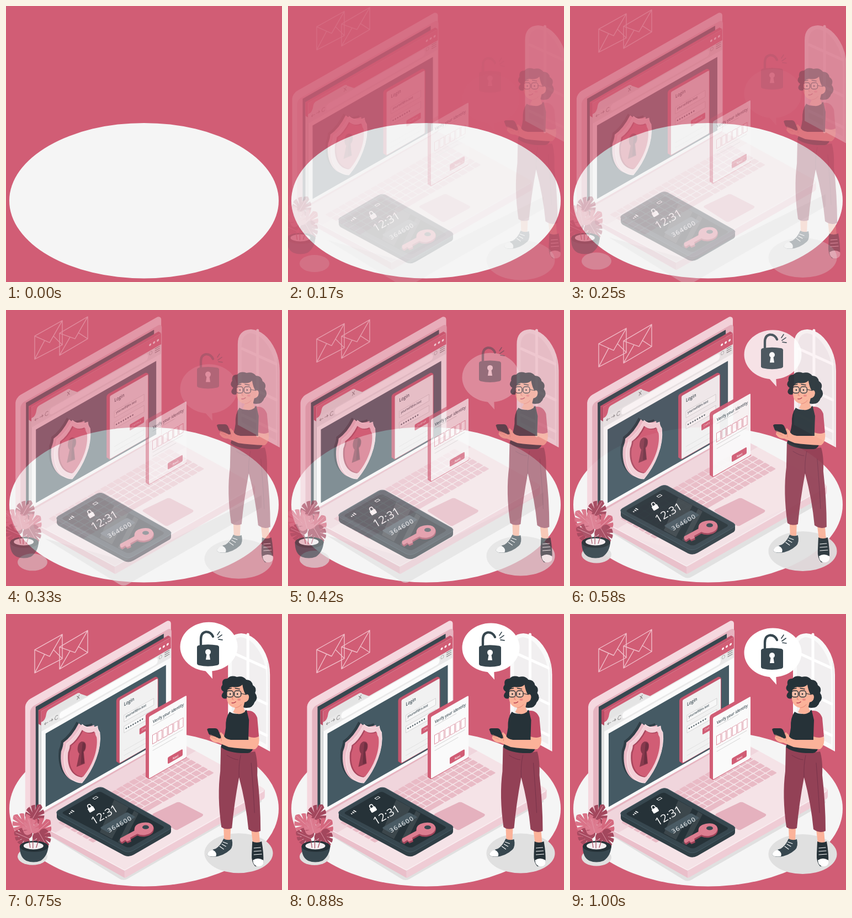
Write an HTML page that moves like this. It is 500 px wide and 500 px high and loops after 1040 ms.

```html
<!DOCTYPE html>
<html lang="en">
<head>
<meta charset="utf-8">
<title>Two-step sign in</title>
<style>
html, body { margin: 0; width: 100%; height: 100%; overflow: hidden; background: #d15d75; }
svg { display: block; width: 100vw; height: 100vh; }
text { font-family: "Open Sans", "Noto Sans", sans-serif; }
</style>
</head>
<body>
<svg id="stage" viewBox="0 0 500 500"></svg>
<script>
const RED = '#d15d75', DARK = '#263238', SLATE = '#37474f', SCREEN = '#455a64';
const SKIN = '#fbb299', WINE = '#934156', PALE = '#f5d8df', ROSE = '#e6b4c0';

const path = (d, fill, extra = '') => `<path d="${d}" fill="${fill}" ${extra}/>`;
const line = (d, color, width = 1, extra = '') =>
  path(d, 'none', `stroke="${color}" stroke-width="${width}" stroke-linecap="round" stroke-linejoin="round" ${extra}`);
const rect = (x, y, w, h, fill, extra = '') =>
  `<rect x="${x}" y="${y}" width="${w}" height="${h}" fill="${fill}" ${extra}/>`;
const ellipse = (x, y, rx, ry, fill, extra = '') =>
  `<ellipse cx="${x}" cy="${y}" rx="${rx}" ry="${ry}" fill="${fill}" ${extra}/>`;
const circle = (x, y, r, fill) => ellipse(x, y, r, r, fill);
const text = (s, size, fill, extra = '') => `<text font-size="${size}" fill="${fill}" ${extra}>${s}</text>`;
const group = (transform, body) => `<g transform="${transform}">${body}</g>`;
const part = (id, body) => `<g id="${id}">${body}</g>`;
const repeat = (n, make) => Array.from({ length: n }, (_, i) => make(i)).join('');

// Isometric planes: upright wall (true x), wall lettering, floor, lettering on the phone.
const wall = (x, y, body) => group(`matrix(1 -.57 0 1 ${x} ${y})`, body);
const wallText = (x, y, s, size, fill, extra) =>
  group(`matrix(.82 -.467 0 1.05 ${x} ${y})`, text(s, size, fill, extra));
const floor = (x, y, body) => group(`matrix(.866 -.5 .866 .5 ${x} ${y})`, body);
const tilted = (x, y, body) => group(`matrix(.87 -.5 .5 .8 ${x} ${y})`, body);

function envelopes() {
  const color = '#f1bfca';
  return line('M52 63L102 35V79L52 105ZM52 63L79 75L102 35M52 105L70 71M102 79L86 63', color, 1.4) +
    line('M97 58L148 28V68L97 98ZM97 58L125 68L148 28M97 98L116 65M148 68L131 57', color, 1.4);
}

function archWindow() {
  const bars = 'M440 37V228M412 70L474 98M412 133L474 163M412 190L474 220';
  return path('M404 208V62Q404 36 428 35Q455 37 472 72Q480 90 480 110V249Z', '#fafafa') +
    path('M411 203V66Q411 44 427 42Q449 44 465 76Q473 94 473 111V236Z', '#f1eff0') +
    line(bars, '#fff', 5) +
    line('M476 88Q478 100 477 246', '#e4dde0', 1);
}

function keyboard() {
  const key = (x, y, w) => rect(x, y, w, 10.6, '#e9bbc6', 'rx="1.5"');
  const row = r => repeat(19, c => {
    if (r === 5 && c > 5 && c < 11) return c === 6 ? key(c * 13.4, r * 12.4, 65) : '';
    return key(c * 13.4, r * 12.4, 11.8);
  });
  return floor(93, 378, repeat(6, row));
}

function browser() {
  const icons = line('M6 27H12M8 25L6 27L8 29M15 27H21M19 25L21 27L19 29', '#8f8f8f', 1) +
    line('M30 25A3 3.5 0 1 0 30 30', '#8f8f8f', 1);
  return path('M57 174L62 176V361L57 356Z', '#e0e0e0') + path('M57 174L62 176V202L57 199Z', '#b84c64') +
    path('M57 174L292 39L297 42L62 177Z', '#c4546c') +
    wall(62, 176,
      rect(0, 0, 235, 184, '#fafafa') + rect(0, 0, 235, 21, RED) +
      path('M2 21Q8 19 9 11Q10 5 14 5H64Q69 5 71 9L84 21Z', '#e4e4e4') +
      rect(0, 20, 235, 17, '#e9e9e9') + rect(33, 22, 178, 12, '#fcfcfc', 'rx="5"') +
      icons + line('M65 10L69 16M69 10L65 16', '#777', 1) +
      [215, 222, 229].map(x => circle(x, 9.5, 2, '#fff')).join('') +
      line('M224 22H232M224 25.5H232M224 29H232', '#777', 1.2) +
      ellipse(216, 25, 2.5, 3, 'none', 'stroke="#aaa" stroke-width=".8"') +
      rect(8, 45, 218, 133, SCREEN));
}

function shield() {
  const shape = 'M0 0Q12 17 28 19Q28 25 32 33C36 66 20 94 0 106C-20 94 -36 66 -32 33Q-28 25 -28 19Q-12 17 0 0Z';
  const inner = fill => group('translate(0 52) scale(.79 .81) translate(0 -52)', path(shape, fill));
  return wall(126, 195, path(shape, '#2f3e46')) +
    wall(130, 198, path(shape, '#ecbcc8')) +
    wall(136, 200, path(shape, '#f3cfd7', 'stroke="#fbe7eb" stroke-width="1"') + inner('#a9475e') +
      group('translate(2 3) scale(.97)', inner(RED))) +
    path('M135 231Q143 230 143 239Q143 246 139 250L141 271L126 277L131 253Q127 249 128 242Q129 233 135 231Z', '#88394d') +
    path('M137 233Q143 233 142 240Q142 246 138 249L140 270L134 272L135 252Z', '#6f3042');
}

function loginCard() {
  const box = (y, w) => rect(8, y, w, 12, '#f7f7f7', 'stroke="#cfcfcf" stroke-width=".7"');
  return path('M198 157Q198 154 201 152L268 114Q272 113 274 117V230L204 271L198 267Z', '#c4546c') +
    wall(204, 156, rect(0, 0, 69, 114, '#f1f1f1', 'rx="2"') + box(32, 54) + box(52, 54) +
      repeat(8, i => circle(12 + i * 4.2, 58, 1.2, SLATE)) +
      rect(36, 72, 26, 11, RED, 'rx="1.5"') + line('M8 96H62M8 105H62V92', '#dcdcdc', .7)) +
    wallText(212, 167, 'Login', 8.5, SLATE, 'font-weight="600"') +
    wallText(215, 188, 'yourself@in.test', 5.8, SLATE, 'font-weight="600"') +
    wallText(244, 212, 'Continue', 4.8, '#fff');
}

function laptop() {
  return wall(33, 159, rect(0, 0, 264, 211, PALE, 'rx="9"')) +
    wall(42, 170, rect(0, 0, 256, 206, ROSE, 'rx="7"')) +
    path('M213 465L467 318V330Q467 334 463 336L218 476Q213 479 213 478Z', '#efccd5') +
    path('M66 385L213 465V478L70 397Q66 395 66 391Z', '#eabfca') +
    path('M66 385L320 236L462 314Q470 318 463 323L217 463Q213 465 209 463Z', '#f5e3e7') +
    line('M68 387L213 464L464 321', '#fbeff2', 1.3) +
    path('M62 364L298 228L342 248L88 396L66 385Z', '#f0d5dc') +
    keyboard() +
    path('M264 365Q262 363 266 361L308 341Q312 340 315 342L354 362Q357 364 353 367L309 391Q306 392 303 390Z', '#e5b1be') +
    wall(52, 168, rect(0, 0, 232, 186, SLATE)) +
    browser() + shield() + loginCard();
}

function identityCard() {
  return path('M253 187Q253 184 256 182L322 145Q326 145 327 149V262L259 301L253 297Z', RED) +
    wall(259, 188, rect(0, 0, 68, 112, '#fafafa', 'rx="2"') +
      line('M7 20H46M7 58H61M7 65H49', '#d4d4d4', 1) +
      repeat(6, i => rect(6.5 + i * 9.6, 37, 7.5, 16, '#fff', 'stroke="#d98a9b" stroke-width=".9"')) +
      rect(34, 93, 27, 12, RED, 'rx="2"')) +
    wallText(266, 200, 'Verify your identity', 7.4, SLATE, 'font-weight="600"') +
    wallText(302, 266, 'Next', 5.5, '#fff', 'font-weight="600"');
}

function phone() {
  const top = 'M94 358L163 318Q170 314 177 317L296 384Q302 388 296 392L231 430Q222 435 214 431L95 366Q89 362 94 358Z';
  return path('M92 362V370Q93 374 97 376L214 439Q222 443 231 438L295 401Q299 399 299 395V388L222 431Z', '#303f46') +
    path(top, SLATE) + path(top, 'none', 'stroke="#455a64" stroke-width="1"') +
    path('M104 360L163 326Q169 322 174 325L284 386Q288 388 284 391L228 423Q222 426 216 423L104 364Q101 362 104 360Z', DARK) +
    path('M196 338L222 352L192 409L170 397ZM232 358L240 363L211 419L203 415Z', '#fff', 'opacity=".1"') +
    floor(113, 363, [2.5, 4, 5.5].map((h, i) => rect(i * 4, 3 - h, 2, h, '#fff')).join('') +
      rect(53, -2, 7, 4, 'none', 'stroke="#fff" stroke-width="1"')) +
    tilted(152, 362, rect(0, -9, 11, 9, '#fff', 'rx="1.5"') + line('M2.5 -9V-12Q2.5 -15 5.5 -15T8.5 -12V-9', '#fff', 1.6)) +
    tilted(159, 384, text('12:31', 20.5, '#fff')) +
    floor(170, 389, rect(0, 0, 57, 18, '#4a5b64', 'rx="3"')) +
    tilted(187, 398, text('364600', 11.5, '#fff', 'letter-spacing="1.6"')) +
    path('M207 411L232 396Q232 384 246 381Q263 378 268 389Q269 402 252 405Q244 406 238 403L226 410L227 414L220 417L217 414L211 418Q205 416 207 411Z', '#9f4359') +
    path('M207 408L233 394Q231 383 246 380Q263 377 267 387Q268 399 252 402Q244 403 238 400L225 407L226 411L219 414L216 411L210 415Q205 413 207 408Z', '#dc7d90') +
    ellipse(253, 388, 6, 3.6, SLATE);
}

function plant() {
  const half = 'M0 0C-9 7 -18 2 -18 -8L-7 -8L-19 -11Q-19 -17 -17 -20L-6 -13L-15 -23Q-13 -27 -9 -29L-4 -19L-6 -31Q-3 -34 0 -35Z';
  const leaf = (x, y, turn, size, fill) => group(`translate(${x} ${y}) rotate(${turn}) scale(${size})`,
    path(half, fill) + group('scale(-1 1)', path(half, fill)) + line('M0 0V-31', '#e9a3b3', .8));
  return line('M46 420Q48 392 55 371M44 420Q36 400 27 383M45 420Q53 402 64 390M45 420Q36 411 29 406M47 420Q58 411 65 409', '#a84a5f', 1.5) +
    leaf(45, 373, 30, .92, '#a3475d') + leaf(38, 388, -48, 1, '#da7388') +
    leaf(51, 398, 48, 1.05, '#d4677d') + leaf(40, 407, -66, .85, '#a84a60') +
    leaf(58, 396, 150, .88, '#a3475d') + leaf(45, 396, -14, .8, '#dc7c90') +
    path('M23 421Q23 441 35 447Q48 452 61 447Q74 438 75 420Z', SLATE) +
    ellipse(49, 421, 26, 10, DARK) + ellipse(48, 420, 18, 6.5, '#f3eef0') +
    line('M42 423L40 410M47 424V409M53 423L57 410', '#a84a5f', 1.2);
}

function bubble() {
  return path('M357 109L374 128L373 108Z', '#fff') + ellipse(367.5, 70, 52, 44.5, '#fff');
}

function padlock() {
  return line('M353 66V52Q353 40 362 38.5Q371 38 375 47', SLATE, 4.3) +
    path('M346 66Q346 64 349 63Q366 60 383 63Q386 64 386 66V96Q386 98 383 99Q366 103 349 99Q346 98 346 96Z', SLATE) +
    circle(366, 75, 5, '#fff') + path('M364 76H368L370 89H362Z', '#fff') +
    line('M383 44L387 38M384 49L391 44M385 52L392 53', SLATE, 1.7);
}

function woman() {
  const hair = 'M396 141Q388 136 394 128Q392 117 403 117Q409 110 420 114Q431 111 437 119Q447 119 449 129Q457 134 453 143Q460 152 452 160Q449 170 438 170Q428 171 426 160L404 148Q403 155 396 153Q389 149 396 141Z';
  const lens = x => rect(x, 139, 12, 11.5, '#fff', `fill-opacity=".18" stroke="${DARK}" stroke-width="1.4" rx="4"`);
  const head = path(hair, DARK) +
    path('M402 142Q403 133 412 132Q424 134 430 128Q432 140 436 146Q442 144 442 151Q441 159 434 160L432 168L435 177Q424 185 413 178L417 170Q404 168 402 154Z', SKIN) +
    line('M417 170Q424 169 428 164', '#e98d7c', 1.2) +
    lens(401.5) + lens(415.5) + line('M427.5 144L437 146', DARK, 1.2) +
    circle(408, 145, 1.4, DARK) + circle(421, 145, 1.4, DARK) +
    line('M403 136L410 134.5M417 134.5L425 136', DARK, 1.5) +
    line('M413 150L411 154L414 155', '#df796e', 1) + line('M411 161Q415 162 418 159', '#b63f50', 1.5) +
    ellipse(424, 155, 3, 2, '#ef8b83');
  const legs = path('M396 386L409 387L408 411L397 411ZM446 390L460 392L462 416L449 416Z', SKIN) +
    path('M391 241Q420 256 453 249Q458 264 457 292Q463 344 463 393Q452 398 441 390Q437 345 424 296Q415 344 411 388Q400 392 392 386Q384 330 390 285Z', WINE) +
    line('M424 296Q423 272 427 256M446 270Q450 320 452 360M402 256Q415 264 422 264', '#78334a', 1);
  const shoes = path('M396 407Q403 411 411 408Q414 421 408 427Q395 439 378 440Q367 440 366 435Q370 428 382 425Q391 419 396 407Z', SLATE) +
    path('M366 435Q369 429 376 427Q385 432 382 439Q368 441 366 435Z', '#fff') +
    path('M448 412Q456 416 465 412Q469 434 468 451Q463 458 453 457Q446 449 447 435Z', DARK) +
    path('M449 446Q458 440 468 446Q470 455 462 457Q450 459 449 446Z', '#fff') +
    line('M389 421L396 426M393 417L400 421M395 413L403 416M451 424L463 423M451 430L464 429M451 436L465 435', '#fff', 1.2);
  const body = path('M407 177Q420 186 437 174L447 180L449 240Q450 250 440 252Q405 253 391 241Q398 222 400 206Q399 188 407 177Z', DARK) +
    path('M438 175Q452 174 457 188L460 222Q450 227 441 222L442 192Z', '#c34e68') +
    path('M460 222Q462 239 453 245Q425 244 405 241L386 233Q377 234 371 225L373 218L386 220L391 214L396 219Q397 226 409 228L441 228V222Q452 226 460 222Z', SKIN) +
    path('M366 209Q367 207 370 207L381 207Q384 207 386 210L392 224Q389 227 385 224L375 221Q371 220 369 217Z', DARK) +
    line('M372 219L382 223M373 223L383 227M391 216L392 230', '#e58e7e', 1);
  return legs + shoes + body + head;
}

const up = ['shadows', 'identity', 'phone'], right = ['laptop', 'plant'], left = ['window', 'woman'];
const stage = document.getElementById('stage');
stage.innerHTML = rect(0, 0, 500, 500, RED) + ellipse(250, 352.7, 244, 140.8, '#f5f5f5') +
  part('shadows', ellipse(48, 441, 27, 15.5, '#e0e0e0') + ellipse(421.5, 435, 62, 36, '#e0e0e0') +
    path('M70 398L205 481Q213 486 221 481L463 342V320L220 440Z', '#e0e0e0')) +
  part('envelopes', envelopes()) + part('window', archWindow()) + part('laptop', laptop()) +
  part('identity', identityCard()) + part('phone', phone()) + part('plant', plant()) +
  part('bubble', bubble()) + part('padlock', padlock()) + part('woman', woman());

const LOOP = 1040, FPS = 24, TRAVEL = 30;

// cubic-bezier(.36, -.01, .5, 1.38), solved by bisection
function ease(x) {
  const curve = (s, a, b) => 3 * (1 - s) ** 2 * s * a + 3 * (1 - s) * s * s * b + s ** 3;
  let low = 0, high = 1;
  for (let i = 0; i < 24; i++) {
    const mid = (low + high) / 2;
    if (curve(mid, .36, .5) < x) low = mid; else high = mid;
  }
  return curve(high, -.01, 1.38);
}

function place(id, x, y, opacity) {
  const node = document.getElementById(id);
  node.setAttribute('transform', `translate(${x.toFixed(2)} ${y.toFixed(2)})`);
  node.setAttribute('opacity', Math.max(0, Math.min(1, opacity)).toFixed(3));
}

function draw(time) {
  const step = Math.min(24, Math.floor((time % LOOP + 5.5) * FPS / 1000));
  const p = step < 2 ? 0 : ease(Math.min(1, (step + .9) / FPS));
  const rest = 1 - p, shift = rest * TRAVEL;
  up.forEach(id => place(id, 0, shift, p));
  right.forEach(id => place(id, -shift, 0, p));
  left.forEach(id => place(id, shift, 0, p));
  place('envelopes', 0, -shift, p);
  const rise = 100 * rest - 40 * rest * rest;
  place('padlock', 0, rise, p ** 2);
  place('bubble', 0, rise * 1.75, p ** 3);
}

const start = performance.now();
function tick() {
  draw(performance.now() - start);
  requestAnimationFrame(tick);
}
tick();
</script>
</body>
</html>
```
